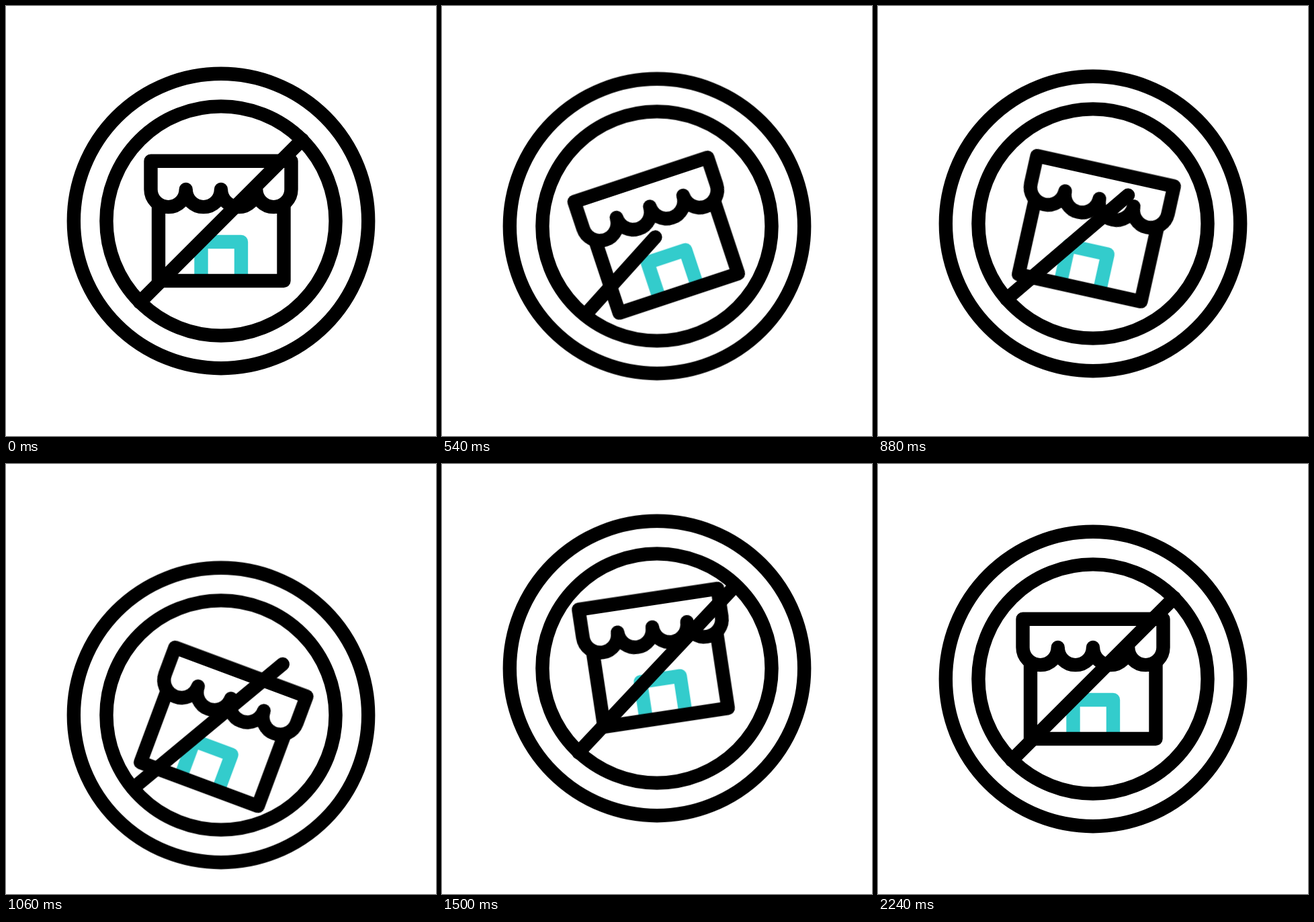
These frames come from a looping animation (640 by 640 pixels, 2400 ms). An HTML page:

```html
<!DOCTYPE html>
<html lang="en">
<head>
<meta charset="utf-8">
<title>Shop closed</title>
<style>
  html, body { margin: 0; width: 100%; height: 100%; overflow: hidden; background: #fff; }
  svg { display: block; width: 100%; height: 100%; }
  .line { fill: none; stroke: #000; stroke-width: 20.4; stroke-linecap: round; stroke-linejoin: round; }
  .door { stroke: #3cc; stroke-linecap: butt; }

  .sign, .shift, .shop, .slash {
    animation: 2400ms cubic-bezier(.37, 0, .63, 1) infinite;
    transform-origin: 0 0;
  }
  .sign { animation-name: bounce; }
  .shift { animation-name: shift; }
  .shop { animation-name: swing; }
  .slash { animation-name: slash; }

  @keyframes bounce {
    0%, 89.5%, 100% { transform: translateY(0); }
    14.92% { transform: translateY(53.7px); }
    29.83% { transform: translateY(-35.2px); }
    44.75% { transform: translateY(54px); }
    59.67% { transform: translateY(-18.8px); }
    74.58% { transform: translateY(14.4px); }
  }
  @keyframes shift {
    0%, 93.33%, 100% { transform: translate(0, 0); }
    15% { transform: translate(8.3px, 30px); }
    30% { transform: translate(0, 1.2px); }
    45% { transform: translate(-1.6px, 19.6px); }
    61.67% { transform: translate(0, -15px); }
    77.08% { transform: translate(0, 11px); animation-timing-function: cubic-bezier(.33, 0, .67, 0); }
  }
  @keyframes swing {
    0%, 93.33%, 100% { transform: rotate(0deg); }
    15% { transform: rotate(-25deg); }
    45% { transform: rotate(20.5deg); }
    61.67% { transform: rotate(-8.7deg); }
    77.08% { transform: rotate(6.4deg); animation-timing-function: cubic-bezier(.33, 0, .67, 0); }
  }
  @keyframes slash {
    0%, 89.5%, 100% { d: path("M-121 121L121 -121"); }
    14.92% { d: path("M-84 149L-28 51"); }
    29.83% { d: path("M-127 115L21 -16"); }
    44.75% { d: path("M-131 109L92 -76"); }
    59.67% { d: path("M-116 126L116 -124"); }
    74.58% { d: path("M-126 118L127 -117"); }
  }
</style>
</head>
<body>
<svg viewBox="0 0 640 640">
  <g transform="translate(320 320)">
    <g class="sign line">
      <circle r="219.2"/>
      <circle r="170.6"/>
      <g class="shift">
        <g class="shop">
          <path class="door" d="M-29.5 84V31H30V84"/>
          <path d="M-93 -22V89H93.5V-22"/>
          <path d="M-104.5 -89.3H104.5V-47a26.12 26.12 0 0 1 -52.25 0a26.12 26.12 0 0 1 -52.25 0a26.12 26.12 0 0 1 -52.25 0a26.12 26.12 0 0 1 -52.25 0Z"/>
        </g>
      </g>
      <path class="slash" d="M-121 121L121 -121"/>
    </g>
  </g>
</svg>
</body>
</html>
```
